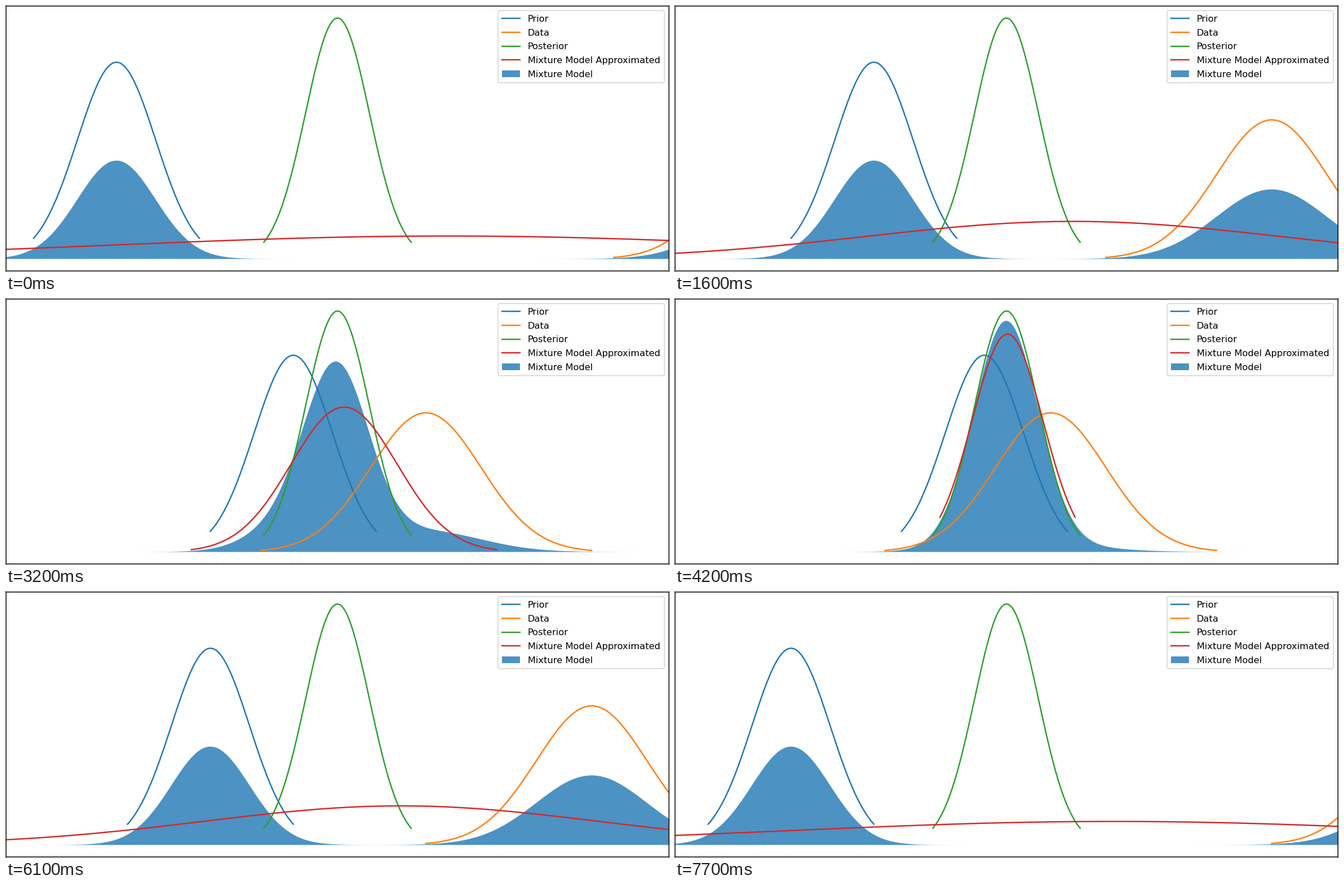
A matplotlib script that plays this animation: 1183 px wide and 473 px high, repeating every 7800 ms.

```python
import numpy as np
import matplotlib.pyplot as plt
from matplotlib.animation import FuncAnimation
from matplotlib.patches import FancyBboxPatch, Rectangle

WIDTH, HEIGHT, DPI = 1183, 473, 120
FRAMES, INTERVAL = 78, 100
HALF_SPAN = 12

PRIOR_VAR, DATA_VAR = 2.0, 4.0
POST_VAR = PRIOR_VAR * DATA_VAR / (PRIOR_VAR + DATA_VAR)
FUSED_ODDS = 16  # odds of the fused hypothesis when prior and data coincide

EM = 16.43  # text size in pixels


def px(pixels):
    return pixels * 72 / DPI


plt.rcParams.update({
    "font.family": "DejaVu Sans",
    "font.size": px(EM),
    "lines.linewidth": px(0.15 * EM),
    "axes.linewidth": px(1.97),
})


def gauss(x, mean, var):
    return np.exp(-(x - mean) ** 2 / (2 * var)) / np.sqrt(2 * np.pi * var)


def bell(mean, var, reach=1.5):
    x = np.linspace(mean - reach * var, mean + reach * var, 600)
    return x, gauss(x, mean, var)


def means(frame):
    """Prior and data approach each other, then retreat."""
    step = FRAMES // 2 - abs(FRAMES // 2 - frame)
    prior = -8 + 0.2 * step
    return prior, -2 * prior


def mixture(prior, data):
    """Weights, means and variances of the three components."""
    total = PRIOR_VAR + DATA_VAR
    odds = FUSED_ODDS * np.exp(-(data - prior) ** 2 / (2 * total))
    fused = odds / (1 + odds)
    post = (prior * DATA_VAR + data * PRIOR_VAR) / total
    weights = np.array([(1 - fused) / 2, (1 - fused) / 2, fused])
    return weights, np.array([prior, data, post]), np.array([PRIOR_VAR, DATA_VAR, POST_VAR])


def draw_legend(labels):
    """Legend in pixel coordinates, anchored to the top right corner."""
    key = fig.add_axes([0, 0, 1, 1])
    key.set(xlim=(0, WIDTH), ylim=(HEIGHT, 0))
    key.axis("off")
    left, top, right, bottom = 878, EM / 2, WIDTH - EM / 2, 136.8
    key.add_patch(FancyBboxPatch(
        (left, top), right - left, bottom - top,
        boxstyle=f"round,pad=0,rounding_size={0.2 * EM}",
        facecolor="white", edgecolor="0.8", linewidth=px(0.1 * EM), alpha=0.8))
    start = left + 0.4 * EM
    end = start + 2 * EM
    for row, label in enumerate(labels):
        y = 22 + 24.75 * row
        if row < len(labels) - 1:
            key.plot([start, end], [y, y], color=f"C{row}")
        else:
            key.add_patch(Rectangle((start, y - 0.35 * EM), 2 * EM, 0.7 * EM,
                                    facecolor="C0", alpha=0.8, linewidth=0))
        key.text(end + 0.8 * EM, y + 0.35 * EM, label, va="baseline")


fig = plt.figure(figsize=(WIDTH / DPI, HEIGHT / DPI), dpi=DPI)
ax = fig.add_axes([0, 0, 1, 1])
peak = gauss(0, 0, POST_VAR)
ax.set(xlim=(-HALF_SPAN, HALF_SPAN), ylim=(-0.05 * peak, 1.05 * peak), xticks=[], yticks=[])

grid = np.linspace(-HALF_SPAN, HALF_SPAN, 1200)
prior_line, data_line, post_line, approx_line = [
    ax.plot([], [], color=f"C{i}")[0] for i in range(4)
]
area = ax.fill_between(grid, 0 * grid, color="C0", alpha=0.8, linewidth=0)
draw_legend(["Prior", "Data", "Posterior", "Mixture Model Approximated", "Mixture Model"])


def update(frame):
    weights, mus, variances = mixture(*means(frame))
    prior_line.set_data(*bell(mus[0], PRIOR_VAR))
    data_line.set_data(*bell(mus[1], DATA_VAR))
    post_line.set_data(*bell(mus[2], POST_VAR, reach=2))

    # Single Gaussian with the mixture's mean and variance
    mean = weights @ mus
    approx_line.set_data(*bell(mean, weights @ (variances + mus**2) - mean**2))

    density = sum(w * gauss(grid, m, v) for w, m, v in zip(weights, mus, variances))
    outline = np.column_stack([grid, density])
    area.set_verts([np.vstack([[grid[0], 0], outline, [grid[-1], 0]])])
    return prior_line, data_line, post_line, approx_line, area


anim = FuncAnimation(fig, update, frames=FRAMES, interval=INTERVAL, repeat=True, repeat_delay=0)
plt.show()
```
